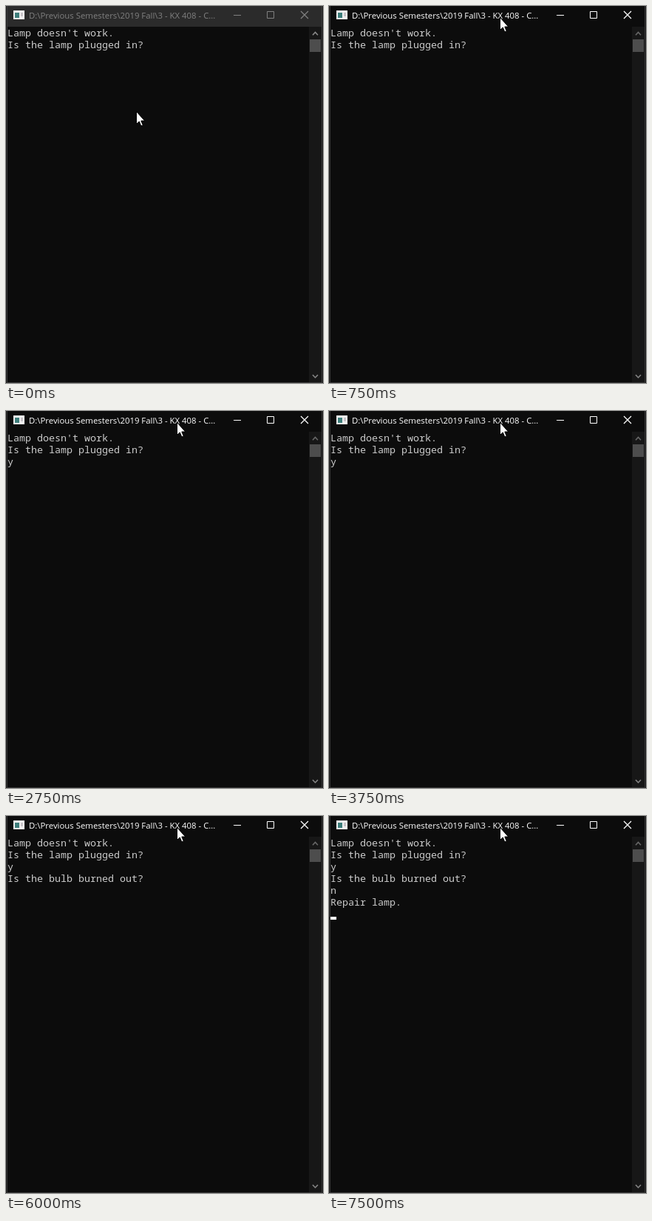
Animation, 429 px wide and 509 px high, one loop 8 s. Source, as an HTML page:

```html
<!DOCTYPE html>
<html lang="en">
<head>
<meta charset="utf-8">
<title>Console</title>
<style>
  html, body { margin: 0; width: 100%; height: 100%; overflow: hidden; background: #0c0c0c; }
  svg { display: block; width: 429px; height: 509px; }
  .crisp { shape-rendering: crispEdges; }
  .caption { font: 11.38px "Open Sans", "Noto Sans", sans-serif; }
  .console text { font: 13.333px "Noto Sans Mono", "DejaVu Sans Mono", monospace; fill: #ccc; }
  .line { fill: none; }
</style>
</head>
<body>
<svg viewBox="0 0 429 509">
  <rect width="429" height="509" fill="#1a1a1a"/>
  <rect x="1" width="427" height="509" fill="#0c0c0c"/>
  <rect id="bar" x="1" width="427" height="28"/>
  <g class="crisp">
    <rect x="410" y="28" width="17" height="480" fill="#171717"/>
    <rect x="411" y="45" width="15" height="17" fill="#4d4d4d"/>
    <path id="border" class="line" d="M1.5 0V508.5H427.5V0"/>
    <rect x="10" y="6" width="15" height="12" fill="#f0f0f0"/>
    <rect x="12" y="9" width="6" height="7" fill="#3f7f7c"/>
    <rect x="20" y="9" width="3" height="5" fill="#c8c4c8"/>
  </g>
  <path id="up" class="line" stroke-width="1.6" d="M415 39.2L418.5 35.5L422 39.2"/>
  <path class="line" stroke="#868686" stroke-width="1.6" d="M415 498L418.5 501.7L422 498"/>
  <text id="caption" class="caption" x="31" y="17">D:\Previous Semesters\2019 Fall\3 - KX 408 - C...</text>
  <g id="buttons" class="line">
    <path d="M308 12.5H318M353.5 7.5H362.5V16.5H353.5Z"/>
    <path stroke-width="1.3" d="M399 7L409 17M409 7L399 17"/>
  </g>
  <g id="console" class="console"></g>
  <rect id="caret" class="crisp" width="8" height="4" fill="#fff"/>
  <path id="pointer" fill="#fff" stroke="#000" d="M.5 .5V17.4L4.3 13.9L6.8 19.9L9.3 18.9L6.8 13H11.7Z"/>
</svg>
<script>
  const LOOP = 8000;
  const FOCUS_AT = 750;
  const ROW = 16, COLUMN = 8, LEFT = 2, TOP = 28;

  // [appears at, text]
  const lines = [
    [0, "Lamp doesn't work."],
    [0, "Is the lamp plugged in?"],
    [2750, "y"],
    [4000, "Is the bulb burned out?"],
    [6500, "n"],
    [7250, "Repair lamp."]
  ];

  // [on, off, column, row]
  const blinks = [
    [1250, 1750, 0, 2],
    [2250, 2750, 0, 2],
    [3250, 3750, 1, 2],
    [4000, 5000, 0, 4],
    [5500, 6000, 0, 4],
    [6500, 7000, 1, 4],
    [7250, LOOP, 0, 6]
  ];

  // [from, x, y]
  const pointerStops = [[0, 176, 142], [250, 217, 42], [500, 231, 15]];

  const byId = id => document.getElementById(id);
  const paint = (id, name, value) => byId(id).setAttribute(name, value);
  const show = (node, visible) => node.setAttribute("visibility", visible ? "visible" : "hidden");

  const rows = lines.map(([, text], row) => {
    const node = document.createElementNS("http://www.w3.org/2000/svg", "text");
    node.setAttribute("x", LEFT);
    node.setAttribute("y", TOP + row * ROW + 13);
    node.textContent = text;
    byId("console").append(node);
    return node;
  });

  function render(time) {
    const focused = time >= FOCUS_AT;
    const ink = focused ? "#fff" : "#808080";
    paint("bar", "fill", focused ? "#0c0c0c" : "#2b2b2b");
    paint("border", "stroke", focused ? "#343434" : "#3c3c3c");
    paint("up", "stroke", focused ? "#686868" : "#8a8a8a");
    paint("caption", "fill", ink);
    paint("buttons", "stroke", ink);

    rows.forEach((node, i) => show(node, time >= lines[i][0]));

    const blink = blinks.find(([on, off]) => time >= on && time < off);
    show(byId("caret"), blink);
    if (blink) {
      paint("caret", "x", LEFT + blink[2] * COLUMN);
      paint("caret", "y", TOP + blink[3] * ROW + 12);
    }

    const [, x, y] = pointerStops.filter(([from]) => time >= from).pop();
    paint("pointer", "transform", `translate(${x} ${y})`);
  }

  const start = performance.now();
  function tick() {
    render((performance.now() - start) % LOOP);
    requestAnimationFrame(tick);
  }
  tick();
</script>
</body>
</html>
```
